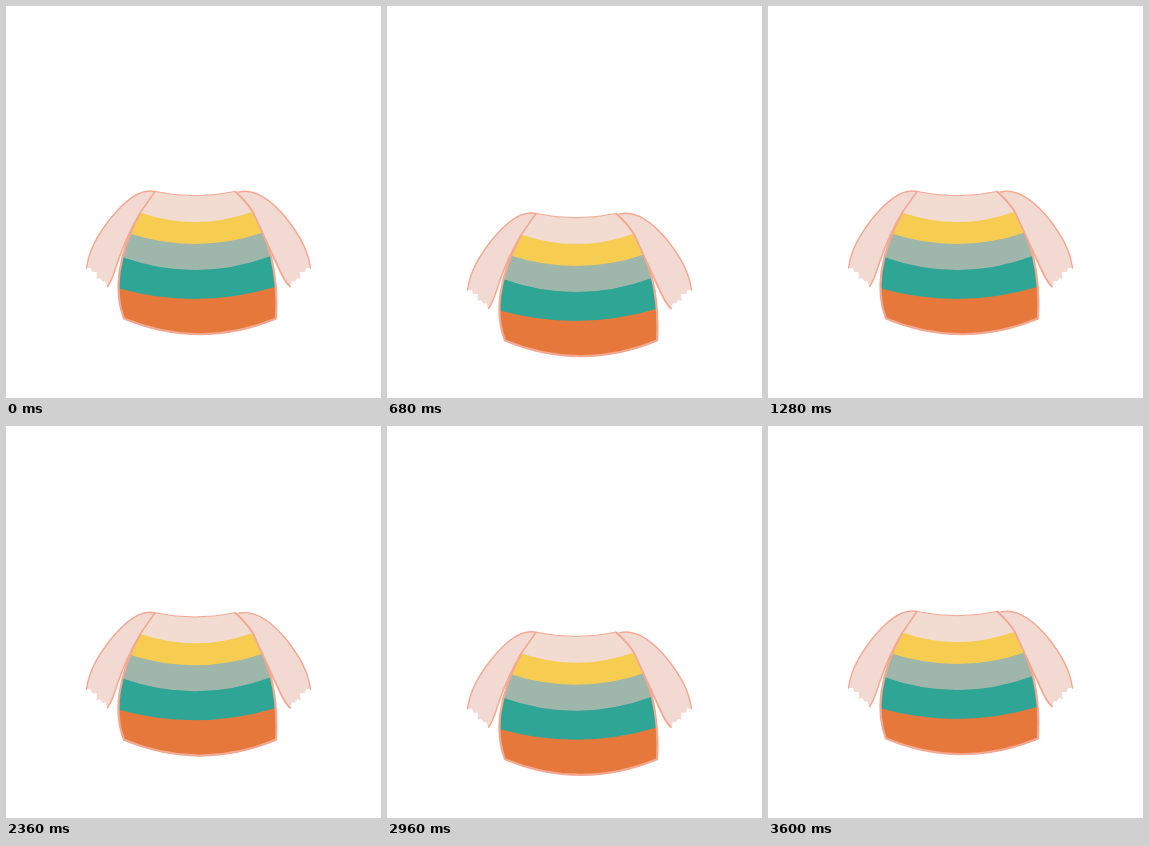
These frames come from a looping animation (375x392 px, 5 s). An HTML page:

```html
<!DOCTYPE html>
<html lang="en">
<head>
<meta charset="utf-8">
<title>Bouncing sweater</title>
<style>
  html, body { margin: 0; width: 100%; height: 100%; overflow: hidden; background: #fff; }
  svg { display: block; width: 375px; height: 392px; }
  .line { fill: none; stroke: #f3a892; stroke-width: 1.8; stroke-linecap: round; stroke-linejoin: round; }
  .sleeve { fill: #f2d9d1; }
</style>
</head>
<body>
<svg viewBox="0 0 375 392">
  <defs>
    <clipPath id="body">
      <path d="M149 185.5Q189 194 229 185.5Q240 195 247 206Q258 226 265 250Q272 280 270 312.5Q194 344 118 312.5Q110 292 113.500 266Q118 236 134 207Z"/>
    </clipPath>
  </defs>
  <g id="sweater">
    <g clip-path="url(#body)">
      <rect x="105" y="180" width="175" height="155" fill="#f2dbd0"/>
      <g id="stripes"></g>
    </g>
    <path class="line" d="M149 185.500Q189 194 229 185.500" style="stroke-width:1"/>
    <path class="line" d="M134 207Q118 236 113.500 266Q110 292 118 312.500Q194 344 270 312.500Q272 280 265 250Q258 226 247 206" style="stroke-width:2.200"/>
    <path class="sleeve" d="M149 185.500C133 182 118 196 104 213C91 230 83 244 80.500 262L85 262L86 266L91 266L90.500 273L94 272L97 276L99 275L101.500 280.500C106 275 108 267 112 255Q121 229 134 207Z"/>
    <path class="line" d="M80.500 262C83 244 91 230 104 213C118 196 133 182 149 185.500" style="stroke-width:1.400"/>
    <path class="line" d="M149 185.500L134 207Q121 229 112 255C108 267 106 275 101.500 280.500" style="stroke-width:1.500"/>
    <path class="sleeve" d="M229 185.500C250 182 267 196 281 213C294 230 302 244 304.500 262L300 262L299 266L294 266L294.500 273L291 272L289 275.500L286 275L284 280.500C277 275 274 264 268 252Q257 228 246 206Z"/>
    <path class="line" d="M304.500 262C302 244 294 230 281 213C267 196 250 182 233 186" style="stroke-width:1.400"/>
    <path class="line" d="M229 185.500Q240 195 247 206Q257 228 268 252C274 264 277 275 284 280.500"/>
  </g>
</svg>
<script>
  const LOOP = 5000, STEP = 40, DROP = 22, DOWN = 680, UP = 600;
  const STARTS = [0, 2320];

  // colour, then left, centre and right height of the upper edge
  const BANDS = [
    ["#f7cd51", 206.5, 216, 206],
    ["#9fb7ab", 227.5, 238, 226.5],
    ["#2ea595", 251, 264, 250],
    ["#e7783b", 282.5, 293, 281]
  ];
  const LEFT = [134, 123.5, 116, 113], RIGHT = [246, 257, 265, 269];

  document.getElementById("stripes").innerHTML = BANDS.map(([fill, a, mid, b], i) => {
    const bend = 2 * mid - (a + b) / 2;
    const cx = (LEFT[i] + RIGHT[i]) / 2;
    return `<path fill="${fill}" d="M100 ${a - 4}L${LEFT[i]} ${a}Q${cx} ${bend} ${RIGHT[i]} ${b}L285 ${b - 4}V340H100Z"/>`;
  }).join("");

  const sweater = document.getElementById("sweater");

  function offset(t) {
    for (const start of STARTS) {
      const p = t - start;
      if (p < 0 || p > DOWN + UP) continue;
      return p < DOWN ? DROP * p / DOWN : DROP * (DOWN + UP - p) / UP;
    }
    return 0;
  }

  function draw(now) {
    const t = Math.floor((now % LOOP) / STEP) * STEP;
    sweater.setAttribute("transform", `translate(0 ${offset(t).toFixed(2)})`);
  }

  const origin = performance.now();
  function tick() {
    draw(performance.now() - origin);
    requestAnimationFrame(tick);
  }
  tick();
</script>
</body>
</html>
```
